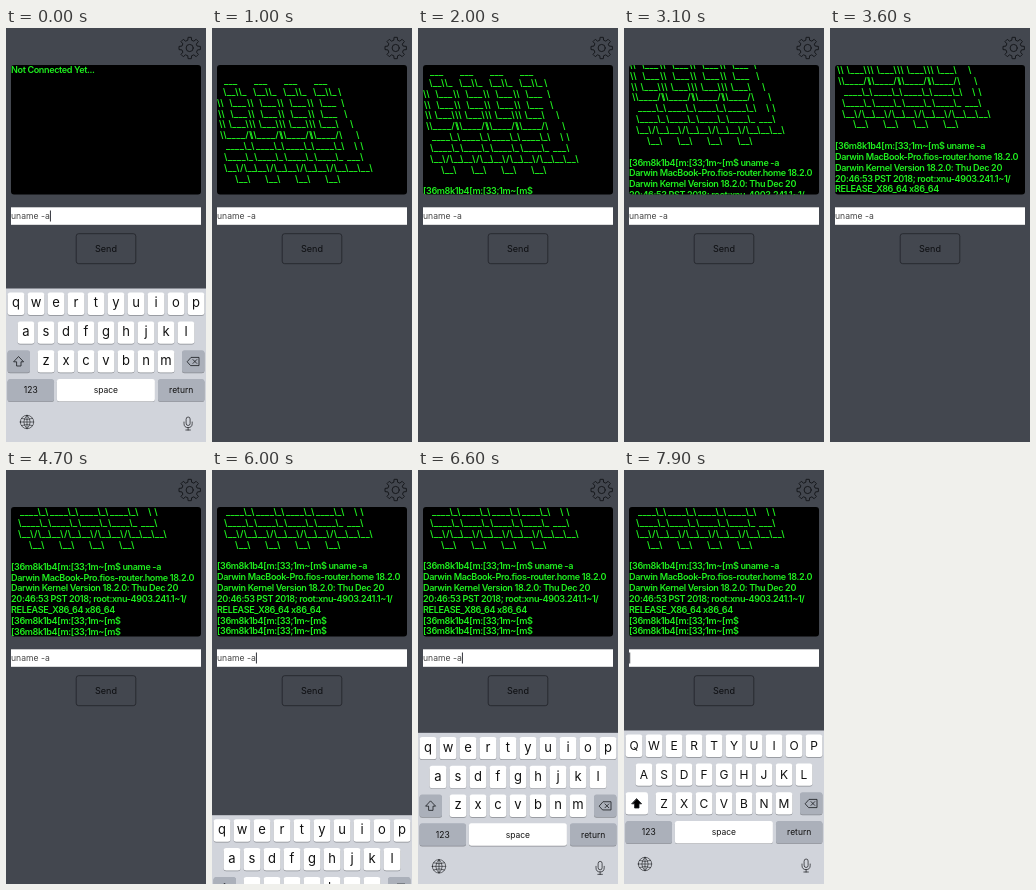
Animation of 200x414 px, one loop 8 s. Source, as an HTML page:

```html
<!DOCTYPE html>
<html lang="en">
<head>
<meta charset="utf-8">
<title>Remote shell</title>
<style>
html, body { margin: 0; width: 100%; height: 100%; overflow: hidden; background: #43474f; }
svg { display: block; width: 100%; height: 100%; }
text { font: 9.07px Inter, "Liberation Sans", sans-serif; white-space: pre; font-variant-ligatures: none; }
#lines text { font-weight: 600; letter-spacing: -.37px; fill: #1ff01f; }
#lines .art { letter-spacing: .3px; }
#field { font-size: 8.6px; fill: #444; }
.mid { text-anchor: middle; }
.icon { fill: none; stroke: #16181c; stroke-linejoin: round; stroke-linecap: round; }
</style>
</head>
<body>
<svg id="stage" viewBox="0 0 200 414">
  <defs><clipPath id="screen"><rect x="5" y="37" width="190" height="129.5" rx="3"/></clipPath></defs>
  <rect width="200" height="414" fill="#43474f"/>
  <g class="icon" transform="translate(183.7 20)"><path id="gear"/><circle r="3.6"/></g>
  <rect x="5" y="37" width="190" height="129.5" rx="3"/>
  <g clip-path="url(#screen)"><g id="lines"></g></g>
  <rect x="5" y="179.3" width="190" height="17.5" fill="#fff"/>
  <text id="field" x="5" y="191.3"></text>
  <rect id="caret" y="182.5" width="1" height="11" fill="#30323a"/>
  <rect x="70.2" y="205.7" width="59.6" height="30" rx="2.5" fill="none" stroke="#1c1e23" stroke-width=".7"/>
  <text class="mid" x="100" y="224" fill="#0d0e11">Send</text>
  <g id="keyboard"><rect y="260.5" width="200" height="160" fill="#d1d4db"/></g>
</svg>
<script>
const LOOP = 8000, STEP = 100, LINE = 10.85, KEYBOARD = 154;
const byId = id => document.getElementById(id);
const clamp = v => Math.max(0, Math.min(1, v));

function add(parent, tag, attrs, label) {
  const el = document.createElementNS("http://www.w3.org/2000/svg", tag);
  for (const name in attrs) el.setAttribute(name, attrs[name]);
  if (label) el.textContent = label;
  return parent.appendChild(el);
}

// Gear outline with eight teeth
const gear = [];
for (let i = 0; i < 8; i++) {
  for (const [turn, r] of [[-.24, 8], [-.15, 10.8], [.15, 10.8], [.24, 8]]) {
    const a = i * Math.PI / 4 + turn;
    gear.push((r * Math.cos(a)).toFixed(2) + " " + (r * Math.sin(a)).toFixed(2));
  }
}
byId("gear").setAttribute("d", "M" + gear.join("L") + "Z");

// Terminal text: each entry shows between two times
const shown = [];
function line(row, x, label, from, to = LOOP) {
  const el = add(byId("lines"), "text", { x, y: 45.1 + row * LINE }, label);
  shown.push({ el, from, to });
  return el;
}

line(0, 5, "Not Connected Yet...", 0, 100);

// Banner rows: start, cell repeated four times, tail position, tail
const banner = [
  [12, "___", 0, ""],
  [11, "\\__\\\\_", 126, "\\"],
  [5, "\\\\  \\___", 129, "\\"],
  [6, "\\\\  \\___", 132, "\\"],
  [7, "\\\\ \\___\\", 138, "\\"],
  [8, "\\\\____/\\", 144, "\\"],
  [14, "____\\_\\", 142, "\\ \\"],
  [12, "\\____\\_", 135, "___\\"],
  [12, "\\__\\/\\__", 133, "\\__\\__\\"],
  [23, "\\__\\", 0, ""]
];
banner.forEach(([x, cell, tailX, tail], i) => {
  const put = (at, s) => line(i + 1, at, s, 900).setAttribute("class", "art");
  for (let k = 0; k < 4; k++) put(x + 30 * k, cell);
  if (tail) put(tailX, tail);
});

const prompt = "[36m8k1b4[m:[33;1m~[m$";
line(12, 5, prompt, 900, 2800);
[
  prompt + " uname -a",
  "Darwin MacBook-Pro.fios-router.home 18.2.0",
  "Darwin Kernel Version 18.2.0: Thu Dec 20",
  "20:46:53 PST 2018; root:xnu-4903.241.1~1/",
  "RELEASE_X86_64 x86_64"
].forEach((s, i) => line(12 + i, 5, s, 2800));
line(17, 5, prompt, 3700);
line(18, 5, prompt, 4600);

// Keyboard
const board = byId("keyboard"), letters = [];
const GREY = "#abb0ba";
function key(x, y, w, fill = "#fff") {
  add(board, "rect", { x, y: y + .7, width: w, height: 22.4, rx: 2.5, fill: "#898c92" });
  return add(board, "rect", { x, y, width: w, height: 22.4, rx: 2.5, fill });
}
const rowY = i => 264.6 + 28.8 * i;
["qwertyuiop", "asdfghjkl", "zxcvbnm"].forEach((row, i) => {
  [...row].forEach((c, k) => {
    const x = [1.6, 11.6, 31.6][i] + 20 * k;
    key(x, rowY(i), 16.8);
    letters.push({ c, y: rowY(i), el: add(board, "text", { class: "mid", x: x + 8.4, fill: "#111" }) });
  });
});
const shiftKey = key(1.6, rowY(2), 22.4, GREY);
const delKey = key(176, rowY(2), 22.4, GREY);
[[1.6, 46.4, "123", GREY], [50.9, 98, "space", "#fff"], [152, 46.4, "return", GREY]].forEach(([x, w, s, fill]) => {
  key(x, rowY(3), w, fill);
  add(board, "text", { class: "mid", x: x + w / 2, y: rowY(3) + 14.2, fill: "#111", style: "font-size:8.5px" }, s);
});
const icon = (d, width = .8) => add(board, "path", { class: "icon", d, "stroke-width": width });
const arrow = icon("M12.8 328.8L17.6 333.8H15V338H10.6V333.8H8Z");
icon("M181.4 333.5L185 329.4H193V337.6H185ZM187 331.6L190.8 335.4M190.8 331.6L187 335.4");
icon("M14.3 394a6.7 6.7 0 1 0 13.4 0a6.7 6.7 0 1 0 -13.4 0ZM14.3 394H27.7M21 387.3V400.7M21 387.3q-6.4 6.7 0 13.4q6.4 -6.7 0 -13.4M15.6 390.5Q21 392.5 26.4 390.5M15.6 397.5Q21 395.5 26.4 397.5", .6);
icon("M180.1 391a2 2 0 0 1 4 0v4.5a2 2 0 0 1 -4 0ZM178 394v1.5a4.1 4.1 0 0 0 8.2 0V394M182.1 399.6V402M179.8 402H184.4", .7);

// Scrolls: start, duration, lines moved, ease-out power
const scrolls = [[1600, 700, 1, 2], [2700, 900, 4, 1.65], [3600, 900, 1, 3.4], [4500, 700, 1, 10]];

function keyboardDrop(t) {
  if (t < 800) return KEYBOARD * (1 - .52 ** (t / 100));
  if (t < 6000) return KEYBOARD;
  return t < 6900 ? KEYBOARD * .55 ** ((t - 5900) / 100) : 0;
}

function draw(t) {
  for (const { el, from, to } of shown) el.style.display = t >= from && t < to ? "" : "none";
  const scroll = scrolls.reduce((sum, [start, span, rows, power]) =>
    sum + rows * (1 - (1 - clamp((t - start) / span)) ** power), 0);
  byId("lines").setAttribute("transform", `translate(0 ${-scroll * LINE})`);

  const left = Math.round(8 * (1 - clamp((t - 7000) / 800)));
  const field = byId("field"), caret = byId("caret"), upper = left === 0;
  field.textContent = "uname -a".slice(0, left);
  caret.setAttribute("x", 5.2 + field.getComputedTextLength());
  caret.style.display = t < 100 || t >= 6000 ? "" : "none";

  board.setAttribute("transform", `translate(0 ${keyboardDrop(t)})`);
  for (const { c, y, el } of letters) {
    el.textContent = upper ? c.toUpperCase() : c;
    el.setAttribute("y", y + (upper ? 15.8 : 14.8));
    el.style.fontSize = upper ? "12px" : "13px";
  }
  shiftKey.setAttribute("fill", upper ? "#fff" : GREY);
  arrow.style.fill = upper ? "#000" : "none";
  delKey.setAttribute("fill", t >= 7100 && t < 7900 ? "#fff" : GREY);
}

function tick() {
  draw(Math.floor(performance.now() % LOOP / STEP) * STEP);
  requestAnimationFrame(tick);
}
tick();
</script>
</body>
</html>
```
